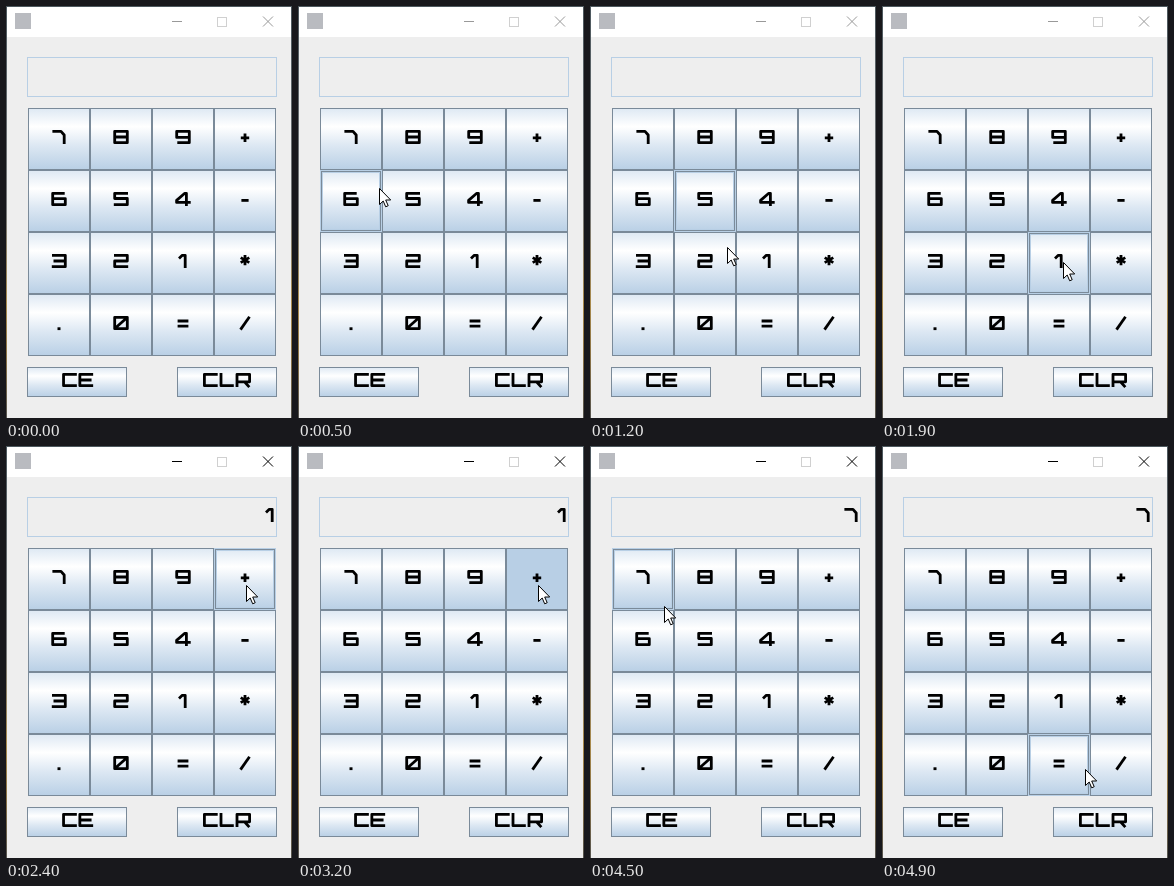
An HTML page for the animation above (5000 ms loop, 286 px wide and 412 px high).

```html
<!DOCTYPE html>
<html lang="en">
<head>
<meta charset="utf-8">
<title>Calculator</title>
<style>
  html, body { margin: 0; width: 100%; height: 100%; overflow: hidden; background: #eee; }
  svg { display: block; width: 286px; height: 412px; }
  .face { fill: none; stroke: #000; stroke-width: 2.8; stroke-linejoin: round; }
  text { font: 700 20px Roboto, sans-serif; text-anchor: middle; fill: none; }
</style>
</head>
<body>
<svg id="stage" viewBox="0 0 286 412">
  <defs>
    <linearGradient id="steel" x2="0" y2="1">
      <stop stop-color="#dde8f3"/>
      <stop offset=".3" stop-color="#fff"/>
      <stop offset=".6" stop-color="#dde8f3"/>
      <stop offset="1" stop-color="#b8cfe5"/>
    </linearGradient>
    <linearGradient id="desk" x2="0" y2="1">
      <stop stop-color="#4d585e"/>
      <stop offset=".5" stop-color="#77797a"/>
      <stop offset=".72" stop-color="#a98a4c"/>
      <stop offset=".85" stop-color="#8b7346"/>
      <stop offset="1" stop-color="#55544f"/>
    </linearGradient>
  </defs>
  <rect width="286" height="412" fill="url(#desk)"/>
  <rect x="1" y="1" width="284" height="411" fill="#eee"/>
  <rect x="1" y="1" width="284" height="30" fill="#fff"/>
  <rect x="9" y="7" width="16" height="16" fill="#b9bbc0"/>
  <g fill="none">
    <path id="controls" d="M166 15.5H176M257 10.5L267 20.5M267 10.5L257 20.5"/>
    <rect x="211.5" y="11.5" width="9" height="9" stroke="#d0d0d0"/>
    <rect x="21.5" y="51.5" width="249" height="39" stroke="#b8cfe5"/>
  </g>
  <g id="keys"></g>
  <g id="display"></g>
  <path id="cursor" d="M.5.5V16.5L4.2 13L6.7 18.8L9.2 17.7L6.7 12H11.7Z" fill="#fff" stroke="#000"/>
</svg>
<script>
const LOOP = 5000, STEP = 100;
const DARK = '#7a8a99', PALE = '#b8cfe5';
const $ = id => document.getElementById(id);

// Centre lines of a wide, squared display face
const glyphs = {
  0: 'M-6.3-5.7H6.3V5.7H-6.3ZM-5.6 5L5.6-5',
  1: 'M-4-2.5L-.7-5.7H2.2V7.1',
  2: 'M-7-5.7H6.3V0H-6.3V5.7H7.2',
  3: 'M-7-5.7H6.3V5.7H-7.2M-5.5 0H6.3',
  4: 'M3.4 7.1V-5.7H1.8L-6.4 1.4V3.4H7.7',
  5: 'M7-5.7H-6.3V-.5H6.3V5.7H-7.2',
  6: 'M5.7-5.7H-6.3V5.7H6.3V-.4H-6.3',
  7: 'M-6.6-5.7H2L5.2-2V7.1',
  8: 'M-6.3-5.7H6.3V5.7H-6.3ZM-6.3 0H6.3',
  9: 'M6.3.4H-6.3V-5.7H6.3V5.7H-5.7',
  '+': 'M-4.2 .8H4.2M0-3.4V5',
  '-': 'M-3.6 1.4H3.6',
  '*': 'M0-6V4.2M-4.3-3.4L4.3 1.6M4.3-3.4L-4.3 1.6',
  '/': 'M-4.5 6.6L4.5-6.2',
  '=': 'M-5.4-2H5.4M-5.4 3.2H5.4',
  '.': 'M-1.5 5.7H1.5',
  C: 'M7-5.7H-6.3V5.7H7',
  E: 'M7-5.7H-6.3V5.7H7M-6.3 0H5.4',
  L: 'M-6-7.1V5.7H6.8',
  R: 'M-6.3 7.1V-5.7H6.3V1.8H-6.3M1.2 1.8L6 7.1'
};

const frame = (x, y, w, h, inset, color) =>
  `<rect x="${x + inset + .5}" y="${y + inset + .5}" width="${w - 1 - 2 * inset}" ` +
  `height="${h - 1 - 2 * inset}" fill="none" stroke="${color}"/>`;

function label(string, x, y, pitch = 16.3) {
  const start = x - pitch * (string.length - 1) / 2;
  const faces = [...string].map((c, i) =>
    `<path class="face" transform="translate(${start + i * pitch} ${y})" d="${glyphs[c]}"/>`);
  return `<text x="${x}" y="${y + 7}">${string}</text>${faces.join('')}`;
}

const keys = [...'789+654-321*.0=/'].map((name, i) =>
  ({ name, x: 22 + i % 4 * 62, y: 102 + (i >> 2) * 62, w: 62, h: 62, dx: 31, dy: 29 }));
keys.push({ name: 'CE', x: 21, y: 361, w: 100, h: 30, dx: 51, dy: 13 },
          { name: 'CLR', x: 171, y: 361, w: 100, h: 30, dx: 50, dy: 13 });

function drawKey({ name, x, y, w, h, dx, dy }, state) {
  const hover = state === 'hover';
  const fill = state === 'pressed' ? PALE : 'url(#steel)';
  const border = hover
    ? frame(x, y, w, h, 0, PALE) + frame(x, y, w, h, 2, PALE) + frame(x, y, w, h, 1, DARK)
    : frame(x, y, w, h, 0, DARK);
  return `<rect x="${x}" y="${y}" width="${w}" height="${h}" fill="${fill}"/>` +
    border + label(name, x + dx, y + dy);
}

// Pointer waypoints: time, x, y
const route = [
  [0, -20, 116], [100, 2, 130], [300, 47, 160], [500, 81, 182], [800, 108, 203],
  [1100, 130, 224], [1200, 137, 241], [1600, 175, 255], [1800, 181, 256], [2100, 181, 256],
  [2300, 234, 152], [2400, 240, 139], [3300, 240, 139], [3600, 60, 130], [3700, 47, 129],
  [4400, 47, 129], [4600, 100, 190], [4800, 192, 309], [4900, 203, 323], [5000, 203, 323]
];

function pointerAt(t) {
  const i = Math.max(1, route.findIndex(p => p[0] >= t));
  const [t0, x0, y0] = route[i - 1], [t1, x1, y1] = route[i];
  const k = Math.max(0, (t - t0) / (t1 - t0));
  return [Math.round(x0 + (x1 - x0) * k), Math.round(y0 + (y1 - y0) * k)];
}

// Key presses: name, start, end
const presses = [['1', 2000, 2100], ['+', 3200, 3300], ['7', 3700, 3900]];

function render(t) {
  const [x, y] = pointerAt(t);
  // Highlighting trails the pointer by one step
  const [hx, hy] = pointerAt(Math.max(0, t - STEP));
  const pressed = presses.find(p => t >= p[1] && t < p[2]);
  const inside = k => hx >= k.x && hx < k.x + k.w && hy >= k.y && hy < k.y + k.h;

  $('keys').innerHTML = keys.map(k => drawKey(k,
    pressed && pressed[0] === k.name ? 'pressed' : inside(k) ? 'hover' : '')).join('');
  $('display').innerHTML =
    t >= 3800 ? label('7', 261, 69) :
    t >= 2100 && t < 3300 ? label('1', 264, 69) : '';
  $('controls').setAttribute('stroke', t >= 2000 ? '#000' : '#999');
  $('cursor').setAttribute('transform', `translate(${x} ${y})`);
  $('cursor').setAttribute('visibility', t < STEP ? 'hidden' : 'visible');
}

const begin = performance.now();
let shown = -1;
function tick() {
  const t = Math.floor((performance.now() - begin) % LOOP / STEP) * STEP;
  if (t !== shown) render(shown = t);
  requestAnimationFrame(tick);
}
tick();
</script>
</body>
</html>
```
